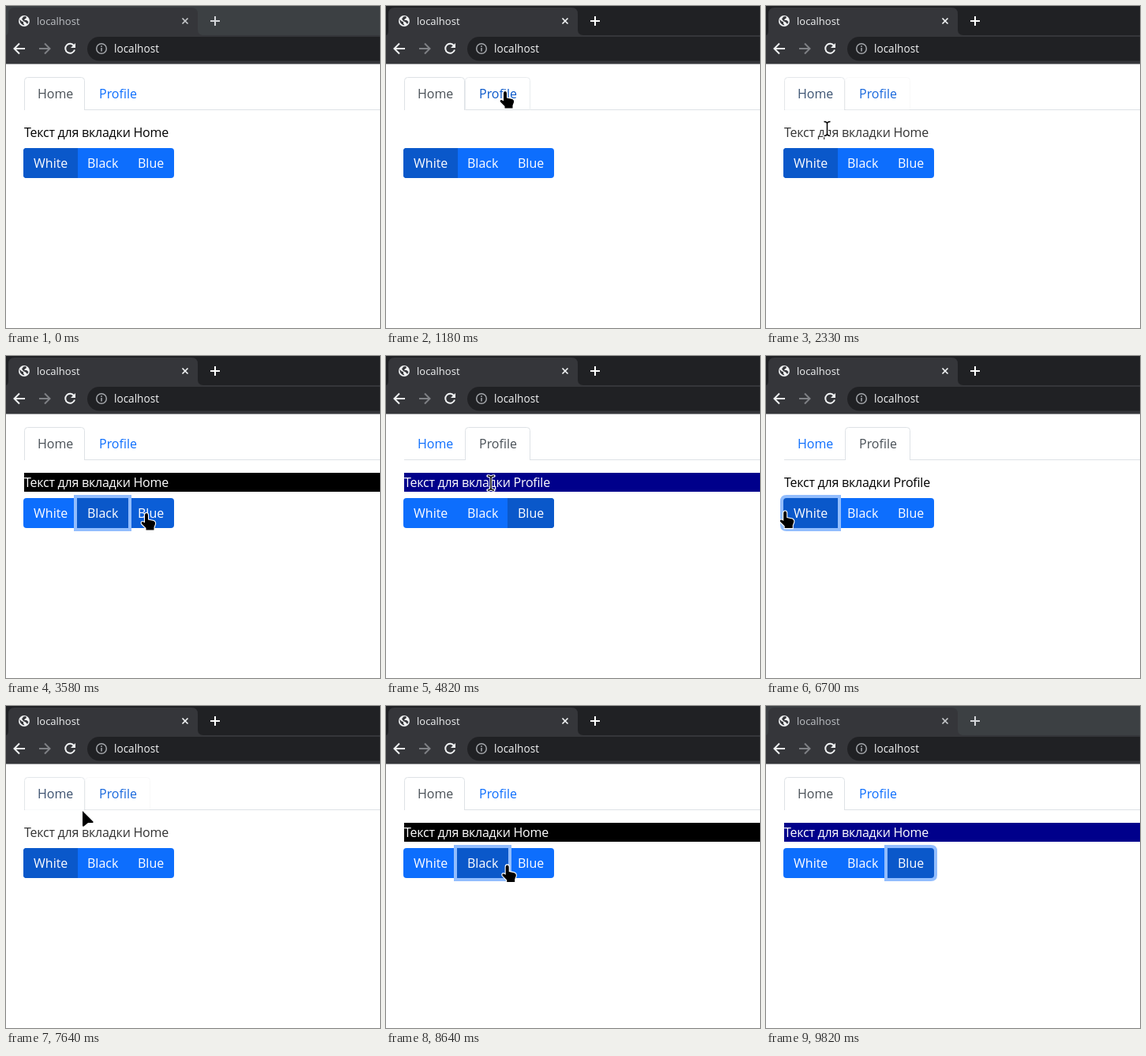
Write an HTML page that moves like this. It is 474 px wide and 408 px high and loops after 9880 ms.

```html
<!DOCTYPE html>
<html lang="ru">
<head>
<meta charset="utf-8">
<title>Tabs</title>
<style>
html, body { margin: 0; width: 100%; height: 100%; overflow: hidden; background: #fff; }
svg { display: block; width: 474px; height: 408px; font: 16px "Open Sans", "Noto Sans", sans-serif; }
</style>
</head>
<body>
<svg id="stage" viewBox="0 0 474 408" xmlns="http://www.w3.org/2000/svg">
  <rect width="474" height="408" fill="#fff"/>

  <rect id="strip" width="474" height="40"/>
  <path d="M0 37Q3 37 3 30V10Q3 2 11 2H235Q243 2 243 10V30Q243 37 250 37H474V73.5H0Z" fill="#35363a"/>
  <rect x="103" y="39" width="400" height="30.5" rx="15.2" fill="#202124"/>
  <g>
    <circle cx="23" cy="19" r="7" fill="#f1f3f4"/>
    <path d="M17.5 17L20 19.500L22 20V22L23.500 24.500L21.500 24Q17 22 17.500 17ZM22 13.500L25 13L26 15L24 16.500L23 18H26L28.500 20L27 23L25 20.500L22 19L20 16.500Z" fill="#35363a"/>
  </g>
  <text id="title" x="39" y="24" font-size="13">localhost</text>
  <path id="close" d="M223.500 15.500L230.500 22.500M230.500 15.500L223.500 22.500" stroke-width="1.7"/>
  <path id="plus" d="M259 19H271M265 13V25" stroke-width="2"/>
  <g fill="none" stroke-width="2">
    <path d="M24 54H11M17 47.500L10.500 54L17 60.500" stroke="#f1f3f4"/>
    <path d="M42 54H55M49 47.500L55.500 54L49 60.500" stroke="#7f8185"/>
    <path d="M86.300 50.500A6 6 0 1 0 87 55.500" stroke="#f1f3f4"/>
    <circle cx="121" cy="54" r="6.300" stroke="#a2a5a9" stroke-width="1.500"/>
    <path d="M121 53V57.500M121 50.300V52" stroke="#a2a5a9" stroke-width="1.600"/>
  </g>
  <path d="M88 47V53H82Z" fill="#f1f3f4"/>
  <text x="137" y="59" font-size="13.600" fill="#f4f5f6">localhost</text>

  <path d="M23 131.500H474" stroke="#dee2e6"/>
  <g id="tabs"></g>
  <g id="pane">
    <rect id="band" x="23" y="148" width="451" height="24"/>
    <text id="copy" x="23" y="166" letter-spacing="-.22"></text>
  </g>
  <g id="buttons"></g>

  <g id="cursor">
    <path id="arrow" d="M0 0L13.500 13.500Q14 15 12.500 15H7L1.500 19.500Q0 20 0 18.500Z" stroke="#fff" stroke-width="1.600" paint-order="stroke"/>
    <path id="hand" d="M-2 1.500Q-2-1 0-1Q2 -1 2 1.500V7.500L9 9Q11.500 10 11 13L9.500 17V20.500H-.5V18L-6 12.500Q-7 10.500 -5 10Q-3.500 10 -2 11.500Z" stroke="#fff" stroke-width="2.200" paint-order="stroke"/>
    <g id="beam" fill="none">
      <path d="M-4-9Q0-9 0-6V6Q0 9-4 9M4-9Q0-9 0-6M0 6Q0 9 4 9" stroke="#fff" stroke-width="3.400" stroke-linecap="round"/>
      <path d="M-4-9Q0-9 0-6V6Q0 9-4 9M4-9Q0-9 0-6M0 6Q0 9 4 9" stroke="#000" stroke-width="1.500"/>
    </g>
  </g>
</svg>
<script>
const LOOP = 9880, FADE = 150, SWAP = 155;
const FOCUS = 1030, BLUR = 9820, ENTER = 30;
const $ = id => document.getElementById(id);

const tabs = [
  { name: 'Home', x: 23, right: 100, textX: 40 },
  { name: 'Profile', x: 100, right: 183, textX: 118 }
];
const buttons = [
  { name: 'White', x: 22, right: 91, textX: 35, band: '#fff', ink: '#000' },
  { name: 'Black', x: 90, right: 155, textX: 103, band: '#000', ink: '#fff' },
  { name: 'Blue', x: 154, right: 213, textX: 167, band: '#00008b', ink: '#fff' }
];
// Clicks: time, kind, index
const clicks = [
  [1030, 'tab', 1], [2060, 'tab', 0], [2850, 'button', 1], [3600, 'button', 2],
  [3850, 'tab', 1], [5700, 'button', 1], [6400, 'button', 0], [7375, 'tab', 0],
  [8350, 'button', 1], [8850, 'button', 2]
];
// Pointer: time, x, y
const route = [
  [30, 256, 205], [450, 215, 150], [850, 158, 112], [1030, 151, 109], [1200, 151, 109],
  [1480, 140, 160], [1650, 118, 184], [2000, 62, 110], [2120, 60, 110],
  [2580, 100, 214], [2800, 120, 203], [3150, 123, 203], [3560, 178, 200], [3640, 178, 200],
  [3830, 150, 110], [4050, 148, 109], [4400, 150, 142], [4820, 133, 161],
  [5300, 62, 208], [5650, 104, 201], [5880, 104, 201], [6350, 40, 202],
  [6800, 22, 197], [7050, 32, 192], [7340, 66, 114], [7460, 68, 113], [7640, 97, 133],
  [7950, 88, 214], [8300, 118, 203], [8450, 119, 203], [8800, 180, 202],
  [9050, 182, 203], [9580, 244, 174]
];

function add(parent, tag, attrs, text) {
  const el = document.createElementNS('http://www.w3.org/2000/svg', tag);
  set(el, attrs);
  if (text) el.textContent = text;
  return parent.appendChild(el);
}
function set(el, attrs) {
  for (const k in attrs) el.setAttribute(k, attrs[k]);
}
// Box with separate left and right corner radii
const box = (x, y, r, b, rl, rr) =>
  `M${x + rl} ${y}H${r - rr}Q${r} ${y} ${r} ${y + rr}V${b - rr}Q${r} ${b} ${r - rr} ${b}` +
  `H${x + rl}Q${x} ${b} ${x} ${b - rl}V${y + rl}Q${x} ${y} ${x + rl} ${y}Z`;
const mix = (a, b, k) => `rgb(${a.map((v, i) => Math.round(v + (b[i] - v) * k))})`;

for (const tab of tabs) {
  const l = tab.x + .5, r = tab.right - .5;
  const d = `M${l} 132V94.5Q${l} 90.500 ${l + 4} 90.500H${r - 4}Q${r} 90.500 ${r} 94.500V132`;
  tab.hover = add($('tabs'), 'path', { d, fill: 'none', stroke: '#e9ecef' });
  tab.frame = add($('tabs'), 'path', { d, fill: '#fff', stroke: '#dee2e6' });
  tab.label = add($('tabs'), 'text', { x: tab.textX, y: 117 }, tab.name);
}
buttons.forEach((b, i) => {
  const rl = i ? 0 : 4, rr = i === 2 ? 4 : 0;
  b.body = add($('buttons'), 'path', { d: box(b.x, 180, b.right, 218, rl, rr) });
  b.ringPath = box(b.x - 4, 176, b.right + 4, 222, rl * 2, rr * 2);
});
for (const b of buttons) {
  b.ring = add($('buttons'), 'path', { d: b.ringPath, fill: '#92bdfd' });
  b.top = add($('buttons'), 'path', { d: b.body.getAttribute('d') });
}
for (const b of buttons) add($('buttons'), 'text', { x: b.textX, y: 205, fill: '#fff' }, b.name);

function last(t, kind, delay = 0) {
  let hit = null;
  for (const c of clicks) if (c[0] + delay <= t && (!kind || c[1] === kind)) hit = c;
  return hit;
}
const activeTab = t => (last(t, 'tab', SWAP) || [0, 0, 0])[2];
const picked = t => (last(t, 'button') || [0, 0, 0])[2];
const paneShown = t => {
  const c = last(t, 'tab');
  return !c || t >= c[0] + SWAP;
};
const focused = (t, i) => {
  const c = last(t);
  return !!c && c[1] === 'button' && c[2] === i;
};

function pointer(t) {
  if (t < ENTER || t >= BLUR) return null;
  const n = route.findIndex(p => p[0] > t);
  if (n < 0) return route[route.length - 1].slice(1);
  const [t0, x0, y0] = route[n - 1], [t1, x1, y1] = route[n];
  const u = (t - t0) / (t1 - t0), k = u * u * (3 - 2 * u);
  return [x0 + (x1 - x0) * k, y0 + (y1 - y0) * k];
}
const within = (p, x, y, r, b) => !!p && p[0] >= x && p[0] < r && p[1] >= y && p[1] < b;
const overTab = (t, tab) => within(pointer(t), tab.x, 90, tab.right, 132);
const overButton = (t, b) => within(pointer(t), b.x, 180, b.right, 218);

// Averaging a switch over the past gives a linear transition
function soft(test, t) {
  const steps = 10;
  let sum = 0;
  for (let k = 0; k < steps; k++) sum += test(t - k * FADE / steps) ? 1 : 0;
  return sum / steps;
}

function drawChrome(t) {
  const on = t >= FOCUS && t < BLUR;
  set($('strip'), { fill: on ? '#202124' : '#3c4043' });
  set($('title'), { fill: on ? '#f1f3f4' : '#bec1c5' });
  set($('close'), { stroke: on ? '#f1f3f4' : '#c6c8cb' });
  set($('plus'), { stroke: on ? '#fff' : '#d5d7da' });
}

function drawPage(t) {
  const link = [13, 110, 253], dark = [10, 88, 202], idle = [73, 80, 87];
  tabs.forEach((tab, i) => {
    const on = soft(s => activeTab(s) === i, t);
    const over = soft(s => overTab(s, tab), t);
    set(tab.frame, { opacity: on });
    set(tab.hover, { opacity: over * (1 - on) });
    const base = link.map((v, j) => v + (dark[j] - v) * over);
    set(tab.label, { fill: mix(base, idle, on) });
  });

  const theme = buttons[picked(t)];
  set($('pane'), { opacity: soft(paneShown, t) });
  set($('band'), { fill: theme.band });
  set($('copy'), { fill: theme.ink });
  $('copy').textContent = 'Текст для вкладки ' + tabs[activeTab(t)].name;

  buttons.forEach((b, i) => {
    const on = soft(s => picked(s) === i, t);
    const over = soft(s => overButton(s, b), t);
    const fill = mix(link, dark, Math.max(on, over * .75));
    const ring = soft(s => focused(s, i), t);
    set(b.body, { fill });
    set(b.ring, { opacity: ring });
    set(b.top, { fill, opacity: Math.max(ring, on) });
  });
}

function drawCursor(t) {
  const p = pointer(t);
  set($('cursor'), { visibility: p ? 'visible' : 'hidden' });
  if (!p) return;
  const textEnd = activeTab(t) ? 215 : 210;
  const shape = tabs.some(tab => overTab(t, tab)) || buttons.some(b => overButton(t, b)) ? 'hand'
    : within(p, 23, 148, textEnd, 172) ? 'beam' : 'arrow';
  for (const id of ['arrow', 'hand', 'beam']) set($(id), { display: id === shape ? 'inline' : 'none' });
  set($('cursor'), { transform: `translate(${p[0].toFixed(1)} ${p[1].toFixed(1)})` });
}

function draw(t) {
  drawChrome(t);
  drawPage(t);
  drawCursor(t);
}

const start = performance.now();
function tick() {
  draw((performance.now() - start) % LOOP);
  requestAnimationFrame(tick);
}
draw(0);
requestAnimationFrame(tick);
</script>
</body>
</html>
```
